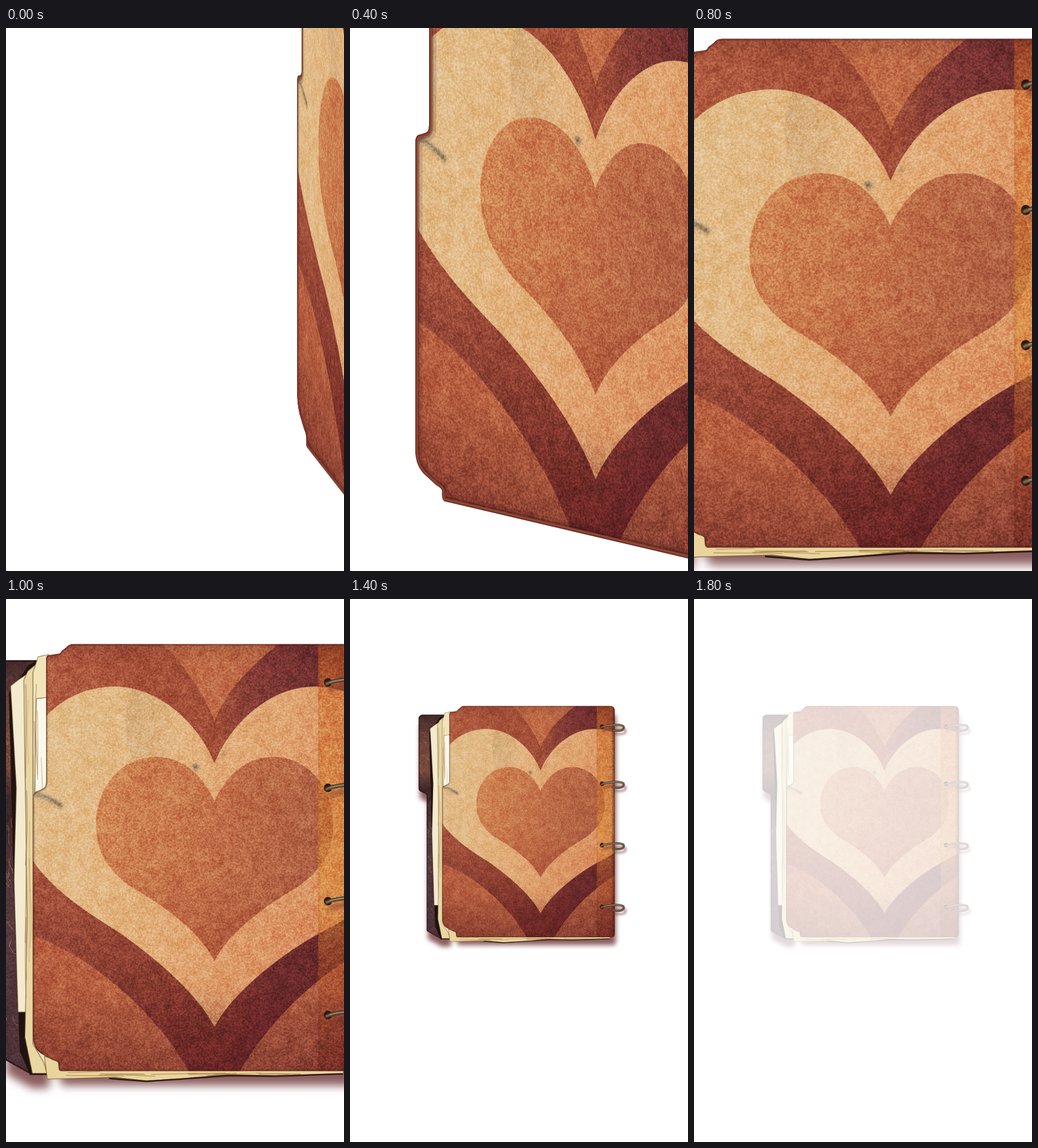
Write an HTML page with a canvas that moves like this. It is 590 px wide and 949 px high and loops after 2100 ms.

```html
<!DOCTYPE html>
<html lang="en">
<head>
<meta charset="utf-8">
<title>Heart notebook</title>
<style>
  html, body { margin: 0; width: 100%; height: 100%; overflow: hidden; background: #fff; }
  canvas { display: block; width: 590px; height: 949px; }
</style>
</head>
<body>
<canvas id="stage" width="590" height="949"></canvas>
<script>
const stage = document.getElementById('stage').getContext('2d');
stage.imageSmoothingQuality = 'high';

// Offscreen layers cover x -50..650, y 60..880 at a finer scale.
const RES = 1.3, LEFT = -50, TOP = 60, W = 700, H = 820;

let seed = 7;
function rand() {
  seed = (seed + 0x6d2b79f5) | 0;
  let t = Math.imul(seed ^ (seed >>> 15), 1 | seed);
  t = (t + Math.imul(t ^ (t >>> 7), 61 | t)) ^ t;
  return ((t ^ (t >>> 14)) >>> 0) / 4294967296;
}
const between = (a, b) => a + (b - a) * rand();

function canvas(w, h) {
  const c = document.createElement('canvas');
  c.width = w;
  c.height = h;
  return c;
}

function layer() {
  const g = canvas(W * RES, H * RES).getContext('2d');
  g.scale(RES, RES);
  g.translate(-LEFT, -TOP);
  return g;
}

function noise(w, h) {
  const c = canvas(w, h), g = c.getContext('2d'), img = g.createImageData(w, h);
  for (let i = 0; i < img.data.length; i += 4) {
    img.data.fill(rand() * 256, i, i + 3);
    img.data[i + 3] = 255;
  }
  g.putImageData(img, 0, 0);
  return c;
}
const fine = noise(420, 492), coarse = noise(60, 70);

function grain(g, clip, amount) {
  g.save();
  g.clip(clip);
  g.globalCompositeOperation = 'overlay';
  for (const [tex, a] of [[fine, amount], [coarse, amount * 0.35]]) {
    g.globalAlpha = a;
    g.drawImage(tex, LEFT, TOP, W, H);
  }
  g.restore();
}

function ramp(g, x0, y0, x1, y1, ...stops) {
  const r = g.createLinearGradient(x0, y0, x1, y1);
  stops.forEach(([at, color]) => r.addColorStop(at, color));
  return r;
}

function fill(g, path, style) {
  g.fillStyle = style;
  g.fill(path);
}

function line(g, path, style, width) {
  g.strokeStyle = style;
  g.lineWidth = width;
  g.stroke(path);
}

// Bezier points run from notch to tip down the left side;
// the right side is mirrored about x = 364 and runs back up.
function heart(left, right = left) {
  const back = right.map(([x, y]) => [728 - x, y]).reverse();
  const points = [...left, ...back.slice(1)], p = new Path2D();
  p.moveTo(...points[0]);
  for (let i = 1; i < points.length; i += 3) p.bezierCurveTo(...points.slice(i, i + 3).flat());
  return p;
}

const coverPath = new Path2D('M117 79H588Q603 79 603 96V813Q603 825 592 825H95Q91 823 92 812Q91 808 82 806L64 796Q48 788 47 766V349Q47 338 55 336L64 332Q70 329 70 321V105Q70 98 76 98L91 96Q95 96 97 91L105 85Q109 79 117 79Z');
const backPath = new Path2D('M-29 118Q-28 110 -18 107H72V829L42 830L-1 806Q-4 803 -3 796V368Q-4 362 -10 361L-24 354Q-29 351 -29 344Z');

const outerSide = [[100, -300], [-150, 300], [40, 588], [110, 603], [245, 695], [318, 823], [333, 845], [349, 868], [364, 890]];
const outer = heart(
  [[364, 213], [345, 165], [312, 115], [268, 72], ...outerSide],
  [[364, 213], [345, 165], [305, 118], [243, 72], ...outerSide]);
const creamLobe = [[364, 287], [335, 215], [265, 153], [190, 153], [95, 153], [20, 230], [20, 340]];
const cream = heart(
  [...creamLobe, [20, 395], [35, 445], [60, 475], [105, 528], [160, 558], [202, 586], [262, 629], [335, 690], [364, 748]],
  [...creamLobe, [20, 450], [60, 505], [100, 535], [140, 565], [175, 580], [205, 598], [265, 636], [335, 692], [364, 748]]);
const inner = heart([[364, 354], [345, 310], [310, 276], [262, 276], [200, 276], [157, 330], [157, 395],
  [157, 455], [195, 490], [232, 511], [285, 543], [340, 585], [364, 633]]);

function paintStains(g) {
  g.save();
  g.clip(cream);
  fill(g, new Path2D('M222 150Q203 200 211 240Q214 270 230 300H320V150Z'),
    ramp(g, 208, 0, 305, 0, [0, 'rgba(120,95,75,.11)'], [0.5, 'rgba(120,95,75,.07)'], [1, 'rgba(120,95,75,0)']));
  g.filter = 'blur(3.5px)';
  line(g, new Path2D('M48 340L72 347L98 362'), 'rgba(80,72,66,.6)', 7);
  fill(g, new Path2D('M325 291L335 289L337 296L329 299Z'), 'rgba(75,65,58,.75)');
  fill(g, new Path2D('M375 268L380 266L382 275L378 276Z'), 'rgba(90,75,60,.4)');
  g.restore();
}

function paintCover() {
  const g = layer();
  g.save();
  g.clip(coverPath);
  fill(g, coverPath, ramp(g, 47, 0, 603, 0, [0, '#b35b3e'], [0.57, '#c06b46'], [1, '#a4533c']));
  fill(g, outer, ramp(g, 47, 0, 560, 0, [0, '#b05a40'], [0.4, '#a65139'], [0.63, '#a04d38'], [0.78, '#7c3733'], [1, '#6b2d2e']));
  fill(g, outer, ramp(g, 0, 430, 0, 720, [0, 'rgba(90,28,32,0)'], [1, 'rgba(90,28,32,.5)']));
  fill(g, cream, ramp(g, 60, 200, 570, 400, [0, '#e0bc88'], [0.4, '#e2b580'], [0.7, '#dfa470'], [1, '#d99060']));
  paintStains(g);
  fill(g, inner, ramp(g, 160, 360, 580, 440, [0, '#cf8352'], [0.45, '#c37149'], [1, '#a7583f']));
  fill(g, inner, ramp(g, 0, 480, 0, 640, [0, 'rgba(155,58,40,0)'], [1, 'rgba(155,58,40,.4)']));

  const spine = new Path2D('M545 79H603V825H545Z');
  fill(g, spine, ramp(g, 0, 79, 0, 825,
    [0, 'rgba(205,98,45,.6)'], [0.3, 'rgba(212,122,46,.5)'], [0.6, 'rgba(222,142,58,.55)'],
    [0.78, 'rgba(185,85,40,.4)'], [1, 'rgba(120,40,28,.4)']));
  fill(g, spine, ramp(g, 545, 0, 603, 0, [0, 'rgba(60,15,10,.1)'], [0.1, 'rgba(60,15,10,0)'], [0.8, 'rgba(60,15,10,.05)'], [1, 'rgba(50,12,10,.6)']));
  fill(g, coverPath, ramp(g, 0, 79, 0, 825,
    [0, 'rgba(70,18,20,.16)'], [0.05, 'rgba(70,18,20,0)'], [0.8, 'rgba(75,15,25,0)'], [1, 'rgba(75,15,25,.42)']));
  grain(g, coverPath, 0.32);
  line(g, coverPath, 'rgba(60,20,15,.22)', 6);
  line(g, coverPath, 'rgba(60,20,15,.6)', 2);
  g.restore();
  return g;
}

function paintBack(g) {
  g.save();
  g.shadowColor = 'rgba(110,52,54,.8)';
  g.shadowBlur = 20;
  g.shadowOffsetX = 5;
  g.shadowOffsetY = 33;
  const body = new Path2D(coverPath);
  body.addPath(backPath);
  fill(g, body, '#4d3034');
  g.restore();

  fill(g, backPath, ramp(g, 0, 107, 0, 830,
    [0, '#43292a'], [0.12, '#6d4439'], [0.25, '#75483a'], [0.34, '#3b2326'], [0.6, '#553a3d'], [1, '#4b2f35']));
  g.save();
  g.clip(backPath);
  for (let i = 0; i < 26; i++) {
    let x = between(-28, 20), y = i < 8 ? between(130, 340) : between(380, 810);
    const vein = new Path2D();
    vein.moveTo(x, y);
    for (let k = 0; k < 4; k++) vein.lineTo(x += between(-6, 9), y += between(-4, 14));
    line(g, vein, 'rgba(205,140,112,.5)', 1);
  }
  line(g, backPath, 'rgba(25,10,12,.7)', 5);
  g.restore();
  grain(g, backPath, 0.22);
}

function paintPages(g) {
  fill(g, new Path2D('M5 165L40 115L72 100V832H42L24 790L14 520Z'), '#20130f');
  const sheets = [
    ['M8 152L22 141L38 130L72 112V722H21L14 490L18 330Z', '#f4ead0'],
    ['M31 142L38 126L50 116L72 104V829H46L33 766L37 560Z', '#e8d6a4'],
    ['M47 128L56 101L74 97V837L66 810L47 778V420Z', '#f1e3ba'],
    ['M53 174L72 172V332L50 340Z', '#fbf7ea'],
    ['M67 799L91 807L93 823H589V829L470 833L385 831L300 839L245 842L190 836L72 839Z', '#e9d49c']
  ];
  for (const [d, color] of sheets) {
    const p = new Path2D(d);
    fill(g, p, color);
    line(g, p, 'rgba(96,66,28,.7)', 1.2);
  }
  for (let i = 0; i < 22; i++) {
    const x = between(34, 62), y = between(130, 600), fold = new Path2D();
    fold.moveTo(x, y);
    fold.quadraticCurveTo(x + between(-4, 4), y + 60, x + between(-2, 3), y + between(80, 200));
    line(g, fold, 'rgba(150,105,45,.5)', between(0.6, 2));
  }
  for (let i = 0; i < 16; i++) {
    const x = between(75, 460), y = between(827, 833), fold = new Path2D();
    fold.moveTo(x, y);
    fold.lineTo(x + between(40, 110), y + between(-2, 2));
    line(g, fold, 'rgba(140,98,42,.6)', 1);
  }
  line(g, new Path2D('M180 838L245 843L305 839L390 833L470 834L588 830'), '#2a1712', 2.5);
}

function paintRing(g, y) {
  g.save();
  g.translate(0, y);
  g.beginPath();
  g.ellipse(562, 0, 7, 7.5, 0, 0, 7);
  g.fillStyle = '#2a1611';
  g.fill();
  g.lineCap = 'round';
  const hoop = new Path2D('M560 2C580 -7 632 -10 632 2C632 13 616 14 598 12');
  g.save();
  g.shadowColor = 'rgba(110,48,50,.5)';
  g.shadowBlur = 8;
  g.shadowOffsetX = 8;
  g.shadowOffsetY = 14;
  line(g, hoop, '#4b3a2b', 7);
  g.restore();
  line(g, hoop, '#7c6850', 3.2);
  line(g, new Path2D('M566 -1C585 -7 620 -8 628 -2'), '#b09c80', 1.2);
  g.restore();
}

function paintBook(cover) {
  const g = layer();
  paintBack(g);
  paintPages(g);
  g.drawImage(cover, LEFT, TOP, W, H);
  [146, 330, 528, 727].forEach(y => paintRing(g, y));
  return g.canvas;
}

const coverLayer = paintCover(), cover = coverLayer.canvas, book = paintBook(cover);

// The swinging cover shows a thick rim that the closed book hides.
coverLayer.clip(coverPath);
line(coverLayer, coverPath, 'rgba(50,18,20,.15)', 24);
line(coverLayer, coverPath, 'rgba(50,18,20,.35)', 14);
line(coverLayer, coverPath, '#8f4532', 8.5);
line(coverLayer, coverPath, '#5e2822', 2.5);

// Swinging cover: left edge x, step height y, width factors b and c, slope k.
function turn({ x, y, b, c, k }) {
  const s = 1.289;
  const source = d => (b - Math.sqrt(Math.max(0, b * b - 4 * c * d))) / (2 * c);
  for (let px = Math.floor(x); px < 590; px++) {
    const from = source(px - x), to = source(px + 1 - x);
    stage.drawImage(cover, (47 + from - LEFT) * RES, 0, (to - from) * RES, H * RES,
      px, y + (TOP - 334) * s + k * (px - x), 1, H * s);
  }
}

function place({ s, x, y, alpha = 1 }) {
  stage.globalAlpha = alpha;
  stage.drawImage(book, x + LEFT * s, y + TOP * s, W * s, H * s);
  stage.globalAlpha = 1;
}

const shut = { s: 0.5417, x: 135.5, y: 144.2 };
const poses = [
  { x: 508, y: 78, b: 0.357, c: 0.00015, k: 1.28 },
  { x: 361, y: 135, b: 0.677, c: 0.000176, k: 0.6 },
  { x: 114, y: 182, b: 1.053, c: 0.00019, k: 0.235 },
  { s: 1.289, x: -126.5, y: -114 },
  { s: 1.1917, x: -90.5, y: -75.1 },
  { s: 1, x: 0, y: 0 },
  { s: 0.81, x: 58, y: 79 },
  shut,
  { ...shut, alpha: 0.6 },
  { ...shut, alpha: 0.23 }
];
const STEP = 200, LOOP = 2100;

let shown = -1, start;
function draw(now) {
  start ??= now;
  const i = Math.min(poses.length - 1, Math.floor(((now - start) % LOOP) / STEP));
  if (i !== shown) {
    shown = i;
    stage.fillStyle = '#fff';
    stage.fillRect(0, 0, 590, 949);
    (poses[i].s ? place : turn)(poses[i]);
  }
  requestAnimationFrame(draw);
}
requestAnimationFrame(draw);
</script>
</body>
</html>
```
